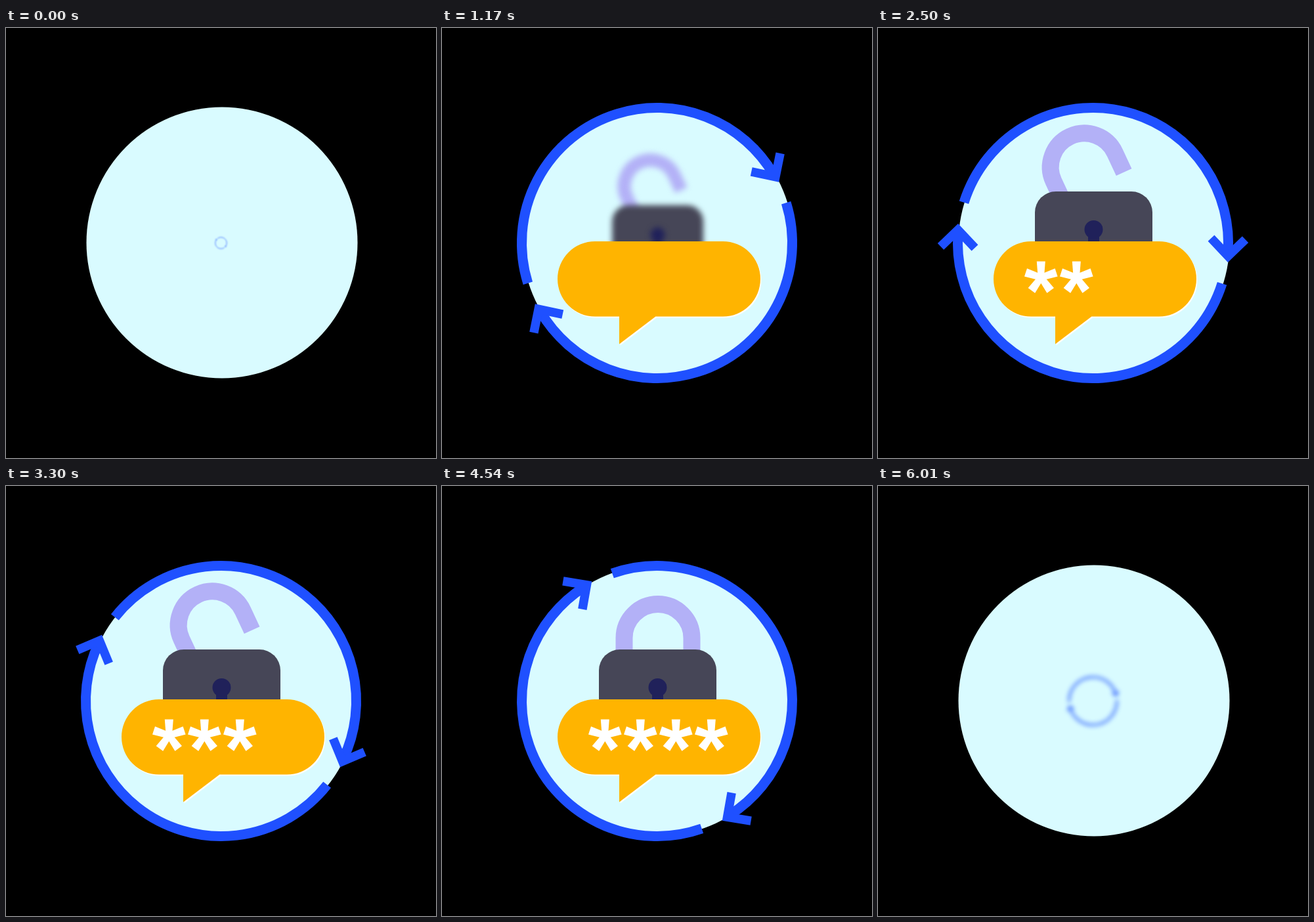
Animation of 655 by 655 pixels, one loop 6050 ms. Source, as an HTML page with a canvas:

```html
<!DOCTYPE html>
<html lang="en">
<head>
<meta charset="utf-8">
<title>Password lock</title>
<style>
html, body { margin: 0; width: 100%; height: 100%; overflow: hidden; background: #000; }
canvas { display: block; width: 655px; height: 655px; }
</style>
</head>
<body>
<canvas width="655" height="655"></canvas>
<script>
const ctx = document.querySelector('canvas').getContext('2d');
const LOOP = 6.05, ZOOM = 0.42, TAU = Math.PI * 2, DEG = Math.PI / 180;
const C = { disc: '#d9fbff', blue: '#1f50ff', amber: '#ffb400', body: '#464657',
  shackle: '#b3b1f7', hole: '#20215a' };
const STARS = [1.5, 2.2, 2.9, 3.6];
const CLOSE = 4.05;

const clamp = x => Math.min(1, Math.max(0, x));
const missingIn = (t, start) => (1 - clamp((t - start) / ZOOM)) ** 2;
const missingOut = (t, start) => clamp((t - start) / ZOOM) ** 2;

// Zooms a part about (x, y) and blurs it while it is small.
function zoomed(t, start, end, x, y, draw) {
  const a = missingIn(t, start), b = missingOut(t, end);
  const scale = 1 - Math.max(a, b);
  if (scale <= 0.001) return;
  const blur = 24 * (1 - scale) * scale;
  ctx.save();
  ctx.translate(x, y);
  ctx.scale(scale, scale);
  ctx.filter = blur > 0.05 ? `blur(${blur}px)` : 'none';
  draw(b - a);
  ctx.restore();
}

function fill(color, build) {
  ctx.fillStyle = color;
  ctx.beginPath();
  build();
  ctx.fill();
}

function poly(...points) {
  points.forEach(([x, y], i) => i ? ctx.lineTo(x, y) : ctx.moveTo(x, y));
  ctx.closePath();
}

function ring(t, spin) {
  ctx.rotate((26.1 * (t - 2.5) + 83 * spin) * DEG);
  ctx.strokeStyle = C.blue;
  for (let i = 0; i < 2; i++) {
    ctx.lineWidth = 15;
    ctx.beginPath();
    ctx.arc(0, 0, 206, -162.6 * DEG, 4.5 * DEG);
    ctx.stroke();
    ctx.lineWidth = 13.5;
    ctx.beginPath();
    ctx.moveTo(180, -7.5);
    ctx.lineTo(205.7, 19.8);
    ctx.lineTo(232, -5.5);
    ctx.stroke();
    ctx.rotate(Math.PI);
  }
}

function lock(t) {
  ctx.translate(-329, -342);
  const p = clamp((t - CLOSE) / 0.3);
  ctx.save();
  ctx.translate(277.5, 255);
  ctx.rotate(-25 * (1 - p * p * (3 - 2 * p)) * DEG);
  ctx.strokeStyle = C.shackle;
  ctx.lineWidth = 26;
  ctx.beginPath();
  ctx.moveTo(0, 9);
  ctx.lineTo(0, -23.5);
  ctx.arc(51.5, -23.5, 51.5, Math.PI, TAU);
  ctx.lineTo(103, 9);
  ctx.stroke();
  ctx.restore();
  fill(C.body, () => ctx.roundRect(239, 249, 179, 165, 32));
  fill(C.hole, () => {
    ctx.arc(328.5, 307, 14, 0, TAU);
    ctx.rect(320, 314, 17, 36);
  });
}

function bubbleShape() {
  ctx.roundRect(176, 325, 309, 114.5, 57.2);
  poly([270, 430], [326, 430], [326, 439], [270, 481.5]);
}

function star(x, y) {
  ctx.save();
  ctx.translate(x, y);
  for (let i = 0; i < 5; i++) {
    fill('#fff', () => poly([-4.5, 2], [-6.5, -24.5], [6.5, -24.5], [4.5, 2]));
    ctx.rotate(TAU / 5);
  }
  ctx.restore();
}

function bubble(t) {
  ctx.translate(-330.5, -382);
  ctx.save();
  ctx.translate(1.5, 2);
  fill('#fff', bubbleShape);
  ctx.restore();
  fill(C.amber, bubbleShape);
  STARS.forEach((start, i) => { if (t >= start) star(248.3 + 54 * i, 380); });
}

function draw(t) {
  ctx.fillStyle = '#000';
  ctx.fillRect(0, 0, 655, 655);
  fill(C.disc, () => ctx.arc(329, 327, 206.5, 0, TAU));
  zoomed(t, -0.008, 5.63, 327.5, 327.5, spin => ring(t, spin));
  zoomed(t, 0.95, 5.15, 329, 342, () => lock(t));
  zoomed(t, 0.5, 5.4, 330.5, 382, () => bubble(t));
}

const begin = performance.now();
function tick() {
  draw((performance.now() - begin) / 1000 % LOOP);
  requestAnimationFrame(tick);
}
tick();
</script>
</body>
</html>
```
